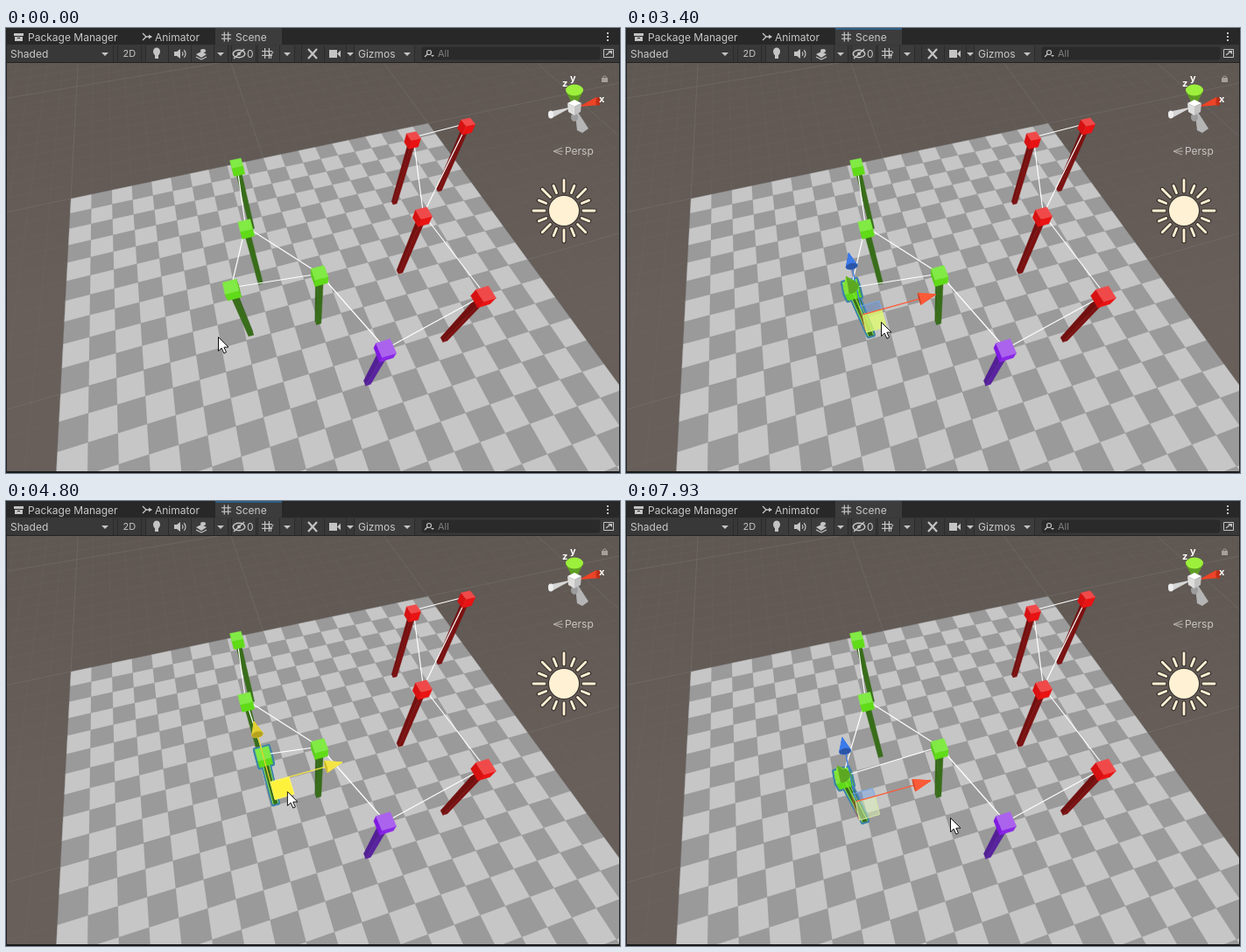
Animation, 701 px wide and 509 px high, one loop 8 s. Source, as an HTML page with a canvas:

```html
<!DOCTYPE html>
<html>
<head>
<meta charset="utf-8">
<style>
html, body { margin: 0; width: 100%; height: 100%; overflow: hidden; background: #191919; }
canvas { display: block; }
</style>
</head>
<body>
<canvas id="stage" width="701" height="509"></canvas>
<script>
const g = document.getElementById('stage').getContext('2d');
const TAU = Math.PI * 2;
const { sin, cos } = Math;
g.lineJoin = 'round';

// Camera: world axes in view space, plane centre, unit size, focal length
const YAW = .299, PITCH = 1.032;
const AX = [cos(YAW), -sin(YAW) * sin(PITCH), sin(YAW) * cos(PITCH)];
const AY = [0, -cos(PITCH), -sin(PITCH)];
const AZ = [-sin(YAW), -cos(YAW) * sin(PITCH), cos(YAW) * cos(PITCH)];
const O = [.0115, .1186, .8126], U = .05526, F = 407, CX = 350.5, CY = 274.5;
const dot = (a, b) => a[0] * b[0] + a[1] * b[1] + a[2] * b[2];
const add = (a, b, k = 1) => a.map((v, i) => v + b[i] * k);

function project([x, y, z]) {
  const c = O.map((o, i) => o + U * (x * AX[i] + y * AY[i] + z * AZ[i]));
  return [CX + F * c[0] / c[2], CY + F * c[1] / c[2]];
}
// Ground position of a post whose cube is seen at (px, py)
const TOP = 3.83;
function ground([px, py]) {
  const ray = [(px - CX) / F, (py - CY) / F, 1];
  const s = ((TOP + .15) * U + dot(AY, O)) / dot(AY, ray);
  const d = ray.map((r, i) => r * s - O[i]);
  return [dot(AX, d) / U, 0, dot(AZ, d) / U];
}

function trace(pts) {
  g.beginPath();
  pts.forEach(p => g.lineTo(p[0], p[1]));
}
function line(pts, color, width = 1) {
  trace(pts);
  g.strokeStyle = color;
  g.lineWidth = width;
  g.stroke();
}
function poly(pts, fill, stroke, width = 1) {
  trace(pts);
  g.closePath();
  g.fillStyle = fill;
  g.fill();
  if (!stroke) return;
  g.strokeStyle = stroke;
  g.lineWidth = width;
  g.stroke();
}
function rect(x, y, w, h, color) { g.fillStyle = color; g.fillRect(x, y, w, h); }
function disc(x, y, rx, ry, color) {
  g.beginPath();
  g.ellipse(x, y, rx, ry, 0, 0, TAU);
  g.fillStyle = color;
  g.fill();
}
function arc(x, y, r, color, width = 1.2, from = 0, to = TAU) {
  g.beginPath();
  g.arc(x, y, r, from, to);
  g.strokeStyle = color;
  g.lineWidth = width;
  g.stroke();
}
function text(s, x, y, color = '#c8c8c8', font = '12px') {
  g.font = font + ' Inter, sans-serif';
  g.fillStyle = color;
  g.fillText(s, x, y);
}

// Box faces as corner indices (bit 0: x, bit 1: y, bit 2: z): left, right, front, top
const FACES = [[0, 4, 6, 2], [5, 1, 3, 7], [1, 0, 2, 3], [6, 7, 3, 2]];
const SHADES = [49, 44, 53, 66];
function box([x, y, z], w, h, [hue, sat, dim], outline) {
  const p = [...Array(8).keys()].map(i => project([
    x + (i & 1 ? w : -w) / 2, y + (i & 2 ? h : -h) / 2, z + (i & 4 ? w : -w) / 2]));
  FACES.forEach((f, i) => {
    const face = f.map(k => p[k]), [a, b, c] = face;
    const facing = (b[0] - a[0]) * (c[1] - a[1]) > (b[1] - a[1]) * (c[0] - a[0]);
    const shade = `hsl(${hue},${sat}%,${SHADES[i] * dim}%)`;
    if (outline) poly(face, outline, outline, 4.5);
    else if (i > 1 || facing) poly(face, shade, shade, .4);
  });
}

// Hue, saturation, brightness of the cube and of the pole
const GREEN = { cube: [98, 80, .9], pole: [98, 62, .5] };
const RED = { cube: [0, 85, .93], pole: [0, 76, .52] };
const PURPLE = { cube: [271, 80, 1], pole: [266, 64, .72] };
const POSTS = [
  [[263.5, 156], GREEN], [[273.5, 227], GREEN], [[257, 297], GREEN], [[358, 281], GREEN],
  [[433.5, 367], PURPLE], [[547, 305], RED], [[476.5, 213], RED], [[465, 125], RED], [[527, 109], RED]
];
const MOVER = 2;

// Moves: start, end, x, y
const POST_MOVES = [[3460, 3930, 285, 297], [3930, 4800, 294, 290], [4800, 5200, 247.5, 315]];
const CURSOR_MOVES = [
  [70, 400, 319, 297], [400, 730, 281, 326], [930, 1400, 291, 336],
  [1870, 2000, 529, 184], [2400, 2530, 291, 336],
  [3460, 3930, 316, 335], [3930, 4800, 321, 332], [4800, 5200, 273, 351],
  [5270, 5800, 593, 190], [6070, 6400, 502, 128], [6400, 6870, 340, 336],
  [6930, 7130, 256, 358], [7130, 7400, 420, 374], [7400, 7600, 370, 362]
];
function follow(from, moves, t) {
  let [x, y] = from;
  for (const [start, end, nx, ny] of moves) {
    const k = Math.min(1, Math.max(0, (t - start) / (end - start)));
    x += (nx - x) * k;
    y += (ny - y) * k;
  }
  return [x, y];
}

function floor() {
  const sky = g.createLinearGradient(0, 40, 0, 330);
  sky.addColorStop(0, '#5f5752');
  sky.addColorStop(1, '#685f5a');
  rect(0, 40, 701, 469, sky);
  const tile = (x, z, s, color) =>
    poly([[x, z], [x + s, z], [x + s, z - s], [x, z - s]].map(([a, b]) => project([a, 0, b])), color);
  tile(-10, 10, 20, '#9a9a9a');
  for (let r = 0; r < 20; r++)
    for (let c = r % 2; c < 20; c += 2) tile(c - 10, 10 - r, 1, '#c6c6c6');
  for (let i = -30; i <= 60; i++) {
    const color = `rgba(125,125,125,${i % 10 ? .1 : .36})`;
    if (i <= 30) line([project([i, 0, -12]), project([i, 0, 60])], color);
    if (i >= -12) line([project([-30, 0, i]), project([30, 0, i])], color);
  }
}

const X = [1, 0, 0], Y = [0, 1, 0], Z = [0, 0, 1], NEAR = [0, 0, -1];

function cone(origin, axis, color, dark) {
  const [a, b, c] = axis, side = [b, c, a], up = [c, a, b];
  const mid = add(origin, axis, 2.12), tip = project(add(origin, axis, 2.75));
  line([project(origin), project(mid)], color, 1.3);
  const rim = [...Array(17).keys()].map(i => {
    const turn = i / 16 * TAU;
    return project(add(add(mid, side, .22 * cos(turn)), up, .22 * sin(turn)));
  });
  if (axis == Y) poly(rim, dark);
  for (let i = 0; i < 16; i++) {
    const shade = axis == Y && (i < 3 || i > 10) ? dark : color;
    poly([rim[i], rim[i + 1], tip], shade, shade, .5);
  }
  if (axis != Y) poly(rim, dark);
}

function handles(base, drag, hover) {
  const c = add(base, Y, 1.9);
  const pane = (a, b, fill, edge) =>
    poly([c, add(c, a, .7), add(add(c, a, .7), b, .7), add(c, b, .7)].map(project), fill, edge);
  if (drag) {
    cone(c, Z, '#e3d032', '#b5a31f');
    cone(c, X, '#f4e546', '#c9b62c');
    pane(X, NEAR, '#fff23c', '#fff673');
    return;
  }
  cone(c, Z, '#3d7bea', '#2a55a8');
  pane(X, Y, 'rgba(90,150,240,.35)', '#78a8e6');
  pane(NEAR, Y, 'rgba(230,80,60,.15)', 'rgba(235,90,60,.6)');
  pane(X, NEAR, hover ? 'rgba(222,250,110,.8)' : 'rgba(225,250,185,.5)', hover ? '#dcf77c' : '#d9e8a2');
  cone(c, X, '#fb5b39', '#b83a22');
  cone(c, Y, '#86e337', '#5ca822');
}

function posts(t) {
  const selected = t >= 930, drag = t >= 3460 && t < 5240;
  const hover = t < 5270 && !(t >= 1870 && t < 2530);
  const tops = POSTS.map(([at], i) => i == MOVER ? follow(at, POST_MOVES, t) : at);
  const items = POSTS.map(([, look], i) => ({ base: ground(tops[i]), look, on: selected && i == MOVER }))
    .sort((a, b) => b.base[2] - a.base[2]);
  const pole = (o, edge) => box(add(o.base, Y, 1.8), .2, 3.6, o.look.pole, edge);
  const cube = (o, edge) => box(add(o.base, Y, TOP), .43, .43, o.look.cube, edge);
  for (const o of items) {
    if (o.on) { pole(o, '#3c83a8'); cube(o, '#3c83a8'); }
    pole(o);
    if (o.on) for (const s of [-.1, .1])
      line([0, 3.6].map(h => project(add(o.base, [s, h, -.1]))), '#8fe65a');
  }
  const link = (a, b) => line([tops[a], tops[b]], '#fff', 1.2);
  for (let i = 0; i < 8; i++) link(i, i + 1);
  link(1, 3);
  link(6, 8);
  items.forEach(o => cube(o));
  if (selected) handles(items.find(o => o.on).base, drag, hover);
}

function compass() {
  poly([[647, 90], [619, 96], [623, 103]], '#d5d5d5');
  disc(622, 99, 3, 4.5, '#eeeeee');
  poly([[649, 90], [652, 117], [658, 120], [665, 115]], '#b5b5b5');
  disc(649, 102, 4, 5, '#9c9c9c');
  poly([[649, 92], [639, 72], [659, 72]], '#5f9e24');
  poly([[654, 90], [674, 79], [677, 88]], '#ee4326');
  disc(676, 84, 2.5, 5, '#bb2f18');
  disc(649, 71, 10, 6.5, '#9cf03c');
  poly([[641, 86], [649, 82], [657, 86], [649, 90]], '#ffffff');
  poly([[641, 86], [649, 90], [649, 100], [642, 96]], '#dedede');
  poly([[657, 86], [649, 90], [649, 100], [656, 96]], '#c2c2c2');
  text('y', 644, 61, '#fff', 'bold 11px');
  text('z', 635, 67, '#fff', 'bold 11px');
  text('x', 677, 85, '#fff', 'bold 11px');
  rect(680, 57, 7, 5, '#a5a09c');
  arc(683.5, 57, 2, '#a5a09c', 1, Math.PI, TAU);
  line([[635, 137], [625, 141], [635, 145]], '#b9b5b2');
  line([[626, 141], [636, 141]], '#b9b5b2');
  text('Persp', 638, 145, '#c9c6c4');
}

function sun() {
  const shine = (color, grow) => {
    g.lineCap = 'round';
    for (let i = 0; i < 16; i++) {
      const a = i * TAU / 16, far = i % 2 ? 31 : 35;
      line([22, far].map(r => [637 + r * cos(a), 209 + r * sin(a)]), color, 2.8 + grow);
    }
    g.lineCap = 'butt';
    disc(637, 209, 17 + grow / 2, 17 + grow / 2, color);
  };
  shine('rgba(45,40,36,.75)', 2.4);
  shine('#fff1d4', 0);
}

const ICON = '#c4c4c4';
const arrow = (x, y = 28) => poly([[x - 4, y], [x + 4, y], [x, y + 4]], ICON);
function hash(x, y, s) {
  for (const k of [.3, .7]) {
    line([[x + s * k, y], [x + s * k, y + s]], ICON, 1.2);
    line([[x, y + s * k], [x + s, y + s * k]], ICON, 1.2);
  }
}

function tabs(focus) {
  rect(0, 0, 701, 20, '#282828');
  rect(239, 0, 76, 20, '#3c3c3c');
  if (focus) rect(239, 0, 76, 2, '#2c5d87');
  rect(9, 6, 11, 3, ICON);
  rect(10, 10, 9, 5, ICON);
  rect(13, 11, 3, 1, '#282828');
  text('Package Manager', 25, 15);
  line([[156, 6], [160, 10], [166, 10]], ICON, 1.3);
  line([[156, 14], [160, 10]], ICON, 1.3);
  poly([[163, 7.5], [167, 10], [163, 12.5]], ICON);
  text('Animator', 170, 15);
  hash(246, 4.5, 11);
  text('Scene', 262, 15);
  for (const y of [5, 9, 13]) rect(686, y, 2, 2, ICON);
}

function button(x, w, color = '#3c3c3c') {
  rect(x, 20, w, 19, '#2b2b2b');
  rect(x + 1, 20, w - 2, 19, color);
}

function toolbar() {
  rect(0, 19, 701, 20, '#383838');
  rect(0, 39, 701, 1, '#232323');
  button(0, 123, '#383838');
  button(127, 28, '#383838');
  for (let i = 0; i < 3; i++) button(159 + i * 26, 27);
  button(237, 17);
  button(257, 29);
  button(287, 26);
  button(312, 18);
  button(337, 27, '#383838');
  button(363, 26, '#383838');
  button(397, 70);
  text('Shaded', 5, 34);
  text('2D', 133.5, 33, ICON, '11px');
  for (const x of [113, 245, 321, 393, 458]) arrow(x);
  disc(172, 27, 4, 4.5, ICON);
  rect(170, 30, 4, 5, ICON);
  poly([[192, 27], [195, 27], [199, 24], [199, 35], [195, 32], [192, 32]], ICON);
  for (const r of [3, 6]) arc(199, 29.5, r, ICON, 1.2, -.8, .8);
  poly([[217, 30], [223, 27], [229, 30], [223, 34]], ICON);
  line([[217, 33], [223, 36], [229, 33]], ICON, 1.2);
  disc(225, 26, 3, 2, ICON);
  disc(266, 29.5, 7.5, 5, ICON);
  disc(266, 29.5, 6, 3.6, '#3c3c3c');
  disc(266, 29.5, 2, 2, ICON);
  line([[260, 35], [272, 24]], ICON, 1.4);
  text('0', 275, 34);
  hash(292, 23, 12);
  text('Y', 299, 35, ICON, '10px');
  line([[345, 24], [355, 35]], ICON, 2.2);
  line([[355, 24], [345, 35]], ICON, 2.2);
  rect(369, 25, 9, 9, ICON);
  poly([[378, 29.5], [382, 25.5], [382, 33.5]], ICON);
  text('Gizmos', 402, 34);

  g.beginPath();
  g.roundRect(474.5, 21.5, 204, 15, 3);
  g.fillStyle = '#2a2a2a';
  g.fill();
  arc(483, 28, 2.5, ICON);
  line([[481, 30], [478, 33]], ICON, 1.3);
  poly([[485, 31], [489, 31], [487, 33]], ICON);
  text('All', 493, 33, '#808080', '11px');
  g.lineWidth = 1;
  g.strokeRect(682.5, 24.5, 11, 9);
  line([[685, 31], [690, 27]], ICON, 1.2);
  poly([[687, 26], [692, 26], [692, 30]], ICON);
}

function pointer([x, y]) {
  const shape = [[0, 0], [0, 16], [3.7, 12.6], [6.4, 18.6], [9, 17.4], [6.4, 11.7], [11.5, 11.5]];
  poly(shape.map(p => [p[0] + x + .5, p[1] + y + .5]), '#fff', '#111');
}

function draw(t) {
  floor();
  posts(t);
  sun();
  compass();
  tabs(t >= 930 && t < 1870 || t >= 2670 && t < 6070);
  toolbar();
  rect(0, 507, 701, 2, '#191919');
  for (const x of [0, 700]) rect(x, 0, 1, 509, '#232323');
  pointer(follow([242, 353], CURSOR_MOVES, t));
}

const start = performance.now();
function tick() {
  draw((performance.now() - start) % 8000);
  requestAnimationFrame(tick);
}
tick();
</script>
</body>
</html>
```
